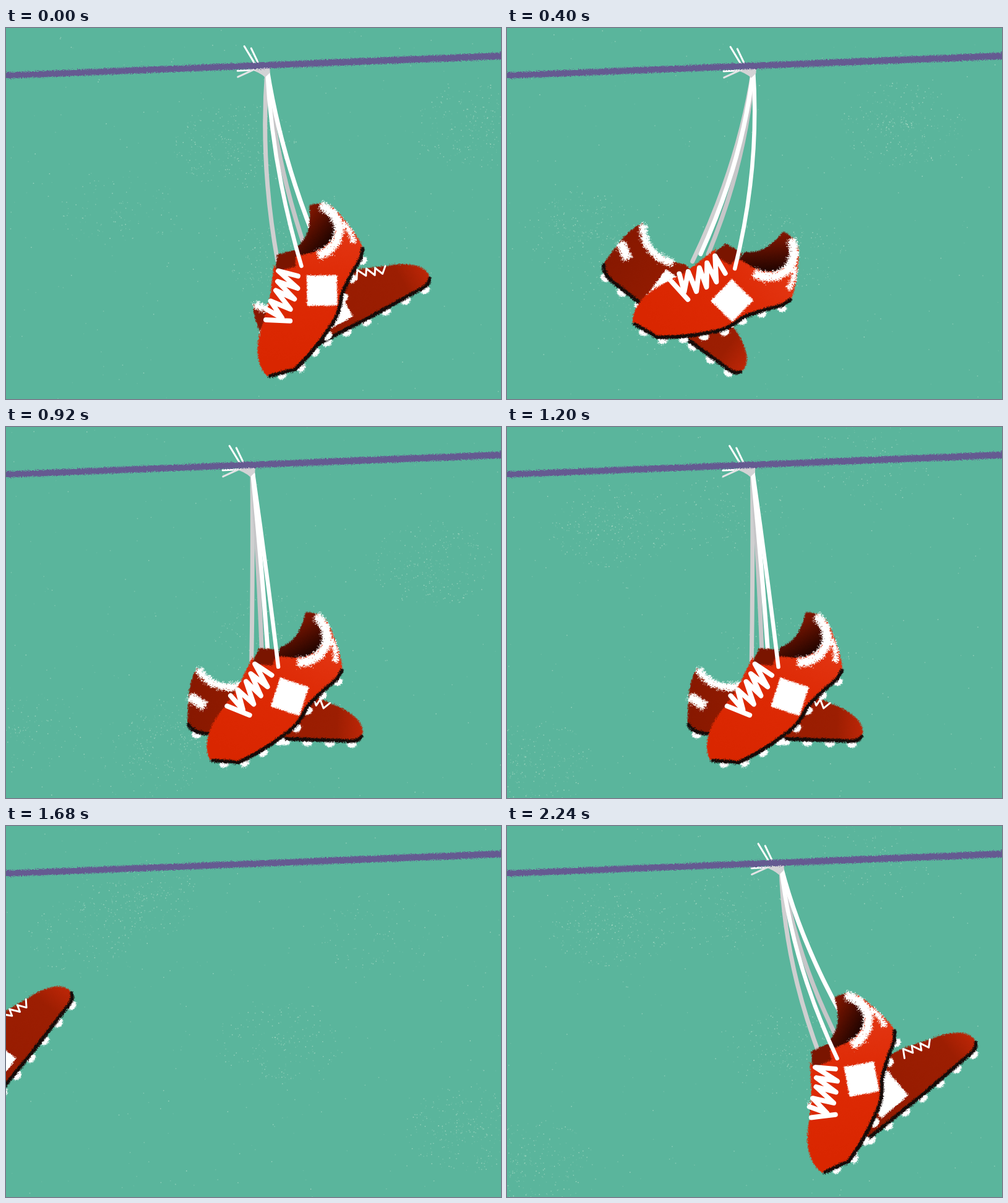
Animation, 800 px wide and 600 px high, one loop 2280 ms. Source, as an HTML page with a canvas:

```html
<!DOCTYPE html>
<html lang="en">
<head>
<meta charset="utf-8">
<title>Boots on a wire</title>
<style>
  html, body { margin: 0; width: 100%; height: 100%; overflow: hidden; background: #5ab59c; }
  canvas, svg { position: absolute; left: 0; top: 0; width: 800px; height: 600px; }
  path { stroke-linecap: round; stroke-linejoin: round; }
  .line { fill: none; }
  .white { stroke: #fff; fill: none; }
  .sole { stroke: #150b09; stroke-width: 6; fill: none; }
  .band { stroke-linecap: butt; }
  .rough { filter: url(#rough); }
  .chalk { filter: url(#chalk); }
</style>
</head>
<body>
<canvas id="grain" width="800" height="600"></canvas>
<svg viewBox="0 0 800 600">
  <defs>
    <filter id="rough" color-interpolation-filters="sRGB">
      <feTurbulence type="fractalNoise" baseFrequency="0.7" numOctaves="2" seed="4"/>
      <feDisplacementMap in="SourceGraphic" scale="7" xChannelSelector="R" yChannelSelector="G"/>
    </filter>
    <filter id="chalk" x="-30%" y="-30%" width="160%" height="160%" color-interpolation-filters="sRGB">
      <feTurbulence type="fractalNoise" baseFrequency="0.8" numOctaves="2" seed="9"/>
      <feDisplacementMap in="SourceGraphic" scale="14" xChannelSelector="R" yChannelSelector="G"/>
    </filter>
    <linearGradient id="inside" x1="0" y1="0" x2="0.6" y2="1">
      <stop offset="0.3" stop-color="#7d1500"/>
      <stop offset="0.85" stop-color="#250500"/>
    </linearGradient>
    <linearGradient id="side">
      <stop offset="0" stop-color="#871800"/>
      <stop offset="0.5" stop-color="#981c01"/>
      <stop offset="0.85" stop-color="#9c1e02"/>
      <stop offset="1" stop-color="#bd2607"/>
    </linearGradient>
    <linearGradient id="upper" x1="0.7" y1="0" x2="0.3" y2="1">
      <stop offset="0" stop-color="#e43a18"/>
      <stop offset="0.45" stop-color="#de2a05"/>
      <stop offset="1" stop-color="#d92600"/>
    </linearGradient>
  </defs>

  <g id="back">
    <g class="rough">
      <g id="backStuds" fill="#fff"></g>
      <path fill="url(#side)" d="M313 397Q302 420 302 450L302 488Q308 500 330 503L470 506L572 505Q587 501 586 485Q581 466 550 451Q520 440 488 427L410 409Q380 425 350 421Q328 412 313 397Z"/>
      <path id="backSole" class="sole" d="M304 489Q310 500 330 502L470 505L570 504Q581 503 584 496"/>
      <g class="chalk white">
        <path stroke-width="12" d="M319 402Q333 421 354 424T388 421"/>
        <path class="band" stroke-width="15" d="M303 443L330 457"/>
      </g>
      <rect x="389" y="434" width="57" height="57" fill="#fff"/>
    </g>
    <path class="white" stroke-width="3" d="M480 441L488 428L496 443L502 433L509 449L515 439L521 453L531 444"/>
  </g>

  <path id="laceC" class="line" stroke="#cfcfd0" stroke-width="7"/>
  <path id="laceD" class="line" stroke="#c6c6c8" stroke-width="7"/>
  <path id="laceB" class="white" stroke-width="7"/>

  <g id="front">
    <g class="rough">
      <g id="frontStuds" fill="#fff"></g>
      <path fill="url(#inside)" d="M481 299Q505 296 518 320L520 365L480 382L440 374L442 358Q474 345 481 299Z"/>
      <path fill="#7a1500" d="M409 360L440 361L437 388L395 392Z"/>
      <path fill="url(#upper)" d="M399 374L388 400Q373 437 347 471Q330 500 331 523Q333 542 341 547L384 547Q424 527 464 491Q478 477 487 454Q500 437 534 406L545 390Q541 360 524 326Q514 302 497 300Q514 318 512 344Q504 369 470 373L436 372L432 387L401 386Z"/>
      <path id="frontSole" class="sole" d="M544 391L536 405Q502 436 489 454Q479 479 464 491Q424 526 384 546L341 545"/>
      <g class="chalk white">
        <path class="band" stroke-width="15" d="M498 304Q522 321 516 351Q506 378 471 381"/>
        <path stroke-width="8" d="M526 343Q534 356 533 374"/>
      </g>
      <rect x="437" y="412" width="49" height="49" fill="#fff" transform="rotate(16 461 437)"/>
    </g>
    <path class="white" stroke-width="8" d="M361 456L398 469M366 439L387 461L377 429L404 451L390 415L415 437L397 402L425 422L403 386L431 403"/>
  </g>

  <path id="laceA" class="white" stroke-width="6.5"/>
  <g id="knot">
    <path fill="#d3d3d5" d="M-28 1L5 -2L4 8L-4 15Q-13 6 -28 1Z"/>
    <path class="white" stroke-width="3" d="M-35 -37L-19 -7M-24 -33L-14 -9M-48 2L-24 2"/>
    <path class="line" stroke="#e4e4e6" stroke-width="3" d="M-48 12L-20 1"/>
  </g>
  <polygon class="rough" fill="#655a91" points="-5,72 805,39.5 805,50.5 -5,82"/>
</svg>

<script>
const LOOP = 2280, STEP = 40, LEAVE = 1120, GONE = 1720, REST = 398;
const $ = id => document.getElementById(id);

// centre of the densest dust patch on each background; the others are random
const DUST = [[370, 190], [170, 160], [640, 155], [745, 490], [690, 220]];

function seeded(seed) {
  return () => (seed = (seed * 16807) % 2147483647) / 2147483647;
}

const ctx = $('grain').getContext('2d');
let shown = -1;
function drawDust(n) {
  if (n === shown) return;
  shown = n;
  const rnd = seeded(911 + n * 7717);
  const dot = (x, y) => {
    ctx.fillStyle = `rgba(205,235,215,${0.1 + 0.5 * rnd() ** 2})`;
    ctx.fillRect(x, y, 1.5, 1.5);
  };
  ctx.fillStyle = '#5ab59c';
  ctx.fillRect(0, 0, 800, 600);
  for (let i = 0; i < 250; i++) dot(rnd() * 800, rnd() * 600);
  for (let p = 0; p < 5; p++) {
    const [x, y] = p ? [rnd() * 800, rnd() * 600] : DUST[n];
    for (let i = p * 50; i < 330; i++) {
      const a = rnd() * Math.PI * 2, r = 100 * rnd() ** 0.7;
      dot(x + r * Math.cos(a), y + 0.7 * r * Math.sin(a));
    }
  }
}

function addStuds(id, sole, dx, dy, tilt) {
  const count = 8, length = sole.getTotalLength();
  for (let i = 0; i < count; i++) {
    const p = sole.getPointAtLength(length * (i + 0.5) / count);
    $(id).innerHTML += `<ellipse rx="8" ry="6" transform="translate(${p.x + dx} ${p.y + dy}) rotate(${tilt})"/>`;
  }
}
addStuds('backStuds', $('backSole'), 0, 5, 0);
addStuds('frontStuds', $('frontSole'), 3, 4, -35);

const leaving = (t, power) => (Math.max(0, t - LEAVE) / 560) ** power;

// a swing that dies out around its rest value, then drags behind as the boots leave
function swing(t, rest, size, crossing) {
  const phase = Math.max(Math.PI * (t - crossing) / 560, -Math.PI / 2);
  const wave = Math.sin(phase) * Math.exp(-((t / 470) ** 3));
  return rest + size * (wave - 0.85 * leaving(t, 3.7));
}

function knotX(t) {
  const arriving = 24 * (Math.max(0, 77 - t) / 77) ** 1.5;
  return REST + arriving - 700 * leaving(t, 3.15);
}

function draw(time) {
  drawDust(Math.floor(time / 200) % 5);
  const t = time < GONE ? time : time - LOOP;
  const x = knotX(t), y = 81.5 - 0.04 * x;

  // the laces swing first, the boots tilt a little later
  const frontX = swing(t, 42, -160, 15), frontY = Math.sqrt(325 ** 2 - frontX ** 2);
  const backX = swing(t, 39, -295, 50), backY = Math.sqrt(390 ** 2 - backX ** 2);
  const frontTilt = swing(t, 2.5, 50, 70), backTilt = swing(t, 2.5, 64, 90);

  const place = (id, dx, dy, angle, px, py) => $(id).setAttribute('transform',
    `translate(${x + dx} ${y + dy}) rotate(${angle}) translate(${-px} ${-py})`);
  const lace = (id, dx, dy) => $(id).setAttribute('d',
    `M${x} ${y + 2}Q${x + dx / 2 + 0.7 * backTilt} ${y + dy / 2} ${x + dx} ${y + dy}`);

  place('front', frontX, frontY, frontTilt, 441, 389);
  place('back', backX, backY, backTilt, 445, 455);
  place('knot', 0, 0, -3, 0, 0);
  lace('laceA', frontX, frontY);
  lace('laceB', 0.75 * backX - 4, 300);
  lace('laceC', 1.35 * frontX - 58, 312);
  lace('laceD', 0.6 * backX - 8, 300);
}

const start = performance.now();
function tick() {
  const t = (performance.now() - start) % LOOP;
  draw(Math.floor(t / STEP) * STEP);
  requestAnimationFrame(tick);
}
tick();
</script>
</body>
</html>
```
